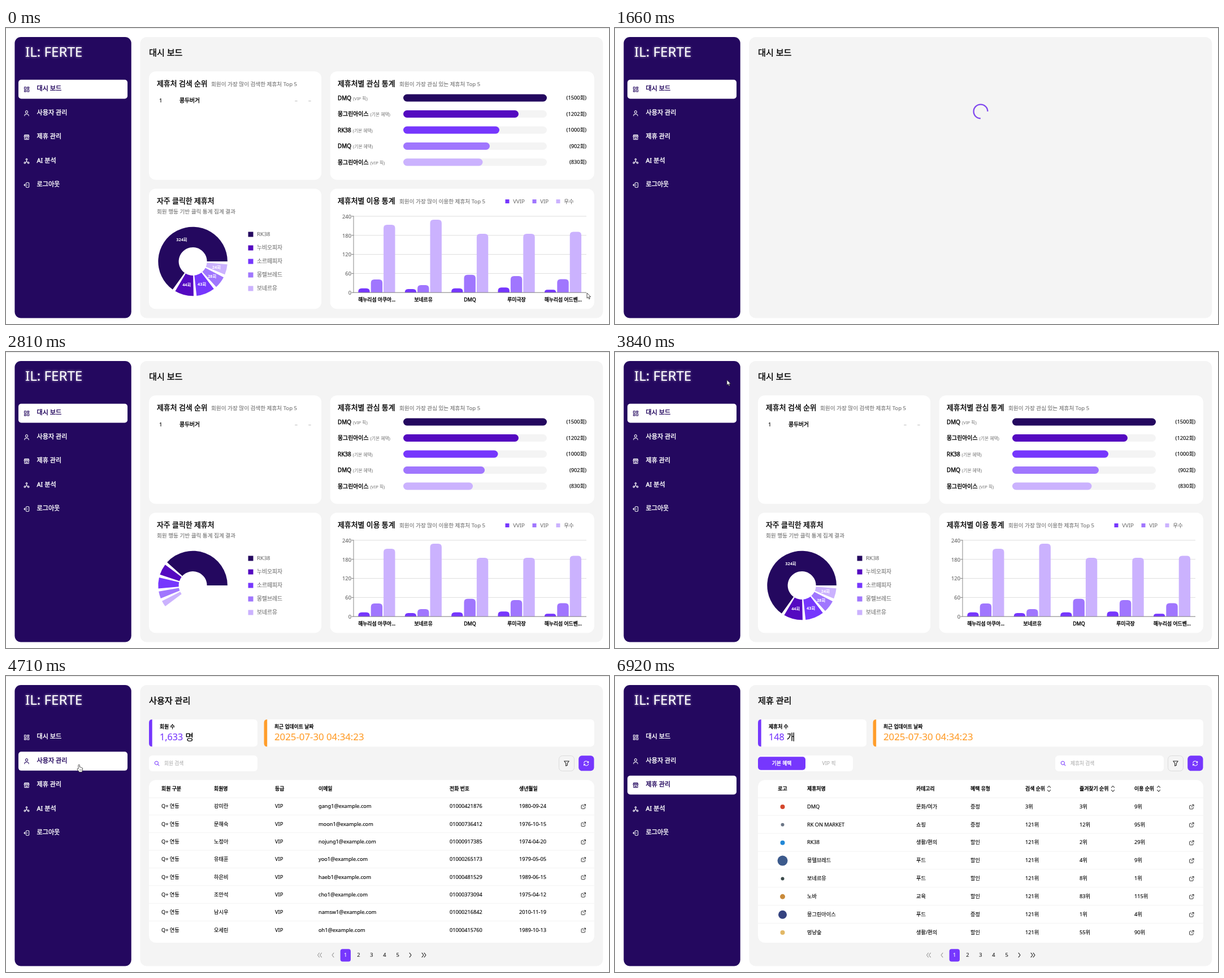
These frames come from a looping animation (1067 px wide and 525 px high, 7.19 s). An HTML page:

```html
<!DOCTYPE html>
<html lang="ko">
<head>
<meta charset="utf-8">
<title>관리자 대시 보드</title>
<style>
  html, body { margin: 0; width: 100%; height: 100%; overflow: hidden; background: #fff; }
  svg { display: block; }
  text { font-family: "Noto Sans", "Noto Sans CJK KR", "Noto Sans CJK", sans-serif; white-space: pre; }
  .line { fill: none; stroke: currentColor; stroke-linecap: round; stroke-linejoin: round; }
  .logo { text-shadow: 0 0 4px rgba(255, 255, 255, .6); }
</style>
</head>
<body>
<svg id="stage" width="1067" height="525" viewBox="0 0 1067 525"></svg>
<script>
const LOOP = 7190;
const DARK = '#24085f', PURPLE = '#7637fd', ORANGE = '#ff9d2b', PANEL = '#f4f4f4', GRAY = '#737373', PALE = '#b0b0b0';
const SHADES = [DARK, '#5409c0', PURPLE, '#a076fe', '#cbb2fe'];

// Times of the scene changes
const LOAD = 1330, MOUNT = 1925, USERS = 4380, USERS_DATA = 4600, SHOPS = 5700, SHOPS_DATA = 5960;

// ---------- drawing helpers ----------
// A thin outline gives the weights between regular and bold
const OUTLINE = { 400: 0.12, 500: 0.4, 700: 0 };
const text = (x, y, size, str, { fill = '#000', w = 400, a = 'start', more = '' } = {}) =>
  `<text x="${x}" y="${y + size * 0.365}" font-size="${size}" fill="${fill}" stroke="${fill}" stroke-width="${OUTLINE[w]}" font-weight="${w === 700 ? 700 : 400}" text-anchor="${a}" ${more}>${str}</text>`;
const rect = (x, y, w, h, r, fill, more = '') =>
  `<rect x="${x}" y="${y}" width="${w}" height="${h}" rx="${r}" fill="${fill}" ${more}/>`;
const icon = (x, y, d, color = 'currentColor', width = 1.05) =>
  `<path class="line" transform="translate(${x} ${y})" d="${d}" style="color:${color}" stroke-width="${width}"/>`;
const group = (id, body) => `<g id="${id}">${body}</g>`;
const list = (items, fn) => items.map(fn).join('');

const ICONS = {
  grid: 'M-4-4h3v4h-3zM1.2-4h3v2.4h-3zM-4 2h3v2.2h-3zM1.2.6h3v3.6h-3z',
  user: 'M0-4.3a2.1 2.1 0 1 1-.01 0M-3.6 4.6V4q0-2.5 3.6-2.5T3.6 4v.6',
  store: 'M-3.6-4h7.2l.8 3q-1.4 1.6-2.9 0q-1.5 1.6-3 0q-1.5 1.6-2.9 0zM-4-2.4H4M-3.6.2V4.2H3.6V.2M-1.2 4V1.8H1.2V4',
  nodes: 'M0-4.2a1.3 1.3 0 1 1-.01 0M-3.2 1.8a1.3 1.3 0 1 1-.01 0M3.2 1.8a1.3 1.3 0 1 1-.01 0M0-1.6V1L-2.2 2.4M0 1L2.2 2.4',
  exit: 'M-1-2V-3q0-1.2 1.2-1.2H3q1.2 0 1.2 1.2V3q0 1.2-1.2 1.2H.2Q-1 4.2-1 3V2M1.4 0H-4.6M-2.8-1.8L-4.6 0L-2.8 1.8',
  search: 'M-.7-3.8a3.1 3.1 0 1 1-.01 0M1.6 1.6L4 4',
  filter: 'M-4.2-4H4.2L1.3-.2V3.2L-1.3 4.4V-.2z',
  refresh: 'M-4-1A4 4 0 0 1 3.4-2L4-1.2M4-3.6V-1.2H1.8M4 1A4 4 0 0 1-3.4 2L-4 1.2M-4 3.6V1.2H-1.8',
  link: 'M-.2-2.6H-2.4q-1 0-1 1V2.8q0 1 1 1H2q1 0 1-1V.6M1.4-3.8H4V-1.2M4-3.8L-.4.6',
  sort: 'M-2.6-2.2L0-5L2.6-2.2M-2.6 2.2L0 5L2.6 2.2',
  left: 'M1.5-3.8L-1.5 0L1.5 3.8', right: 'M-1.5-3.8L1.5 0L-1.5 3.8',
  left2: 'M-.5-3.8L-3.5 0L-.5 3.8M3.5-3.8L.5 0L3.5 3.8', right2: 'M-3.5-3.8L-.5 0L-3.5 3.8M.5-3.8L3.5 0L.5 3.8'
};

// ---------- sidebar ----------
const NAV = [['grid', '대시 보드'], ['user', '사용자 관리'], ['store', '제휴 관리'], ['nodes', 'AI 분석'], ['exit', '로그아웃']];
const navY = i => 91.8 + i * 42.45;
const sidebar = rect(15.4, 16, 206.3, 498.5, 11, DARK) +
  text(34, 42.5, 24.1, 'IL: FERTE', { fill: '#fff', more: 'class="logo"' }) +
  list(NAV, ([ic, name], i) => `<g class="nav">${rect(22, navY(i), 193, 33.6, 5, '#fff')}` +
    icon(36.5, navY(i) + 16.9, ICONS[ic]) +
    text(54.5, navY(i) + 15.6, 11.1, name, { fill: 'currentColor', w: 500 }) + '</g>');

// ---------- dashboard ----------
const INTEREST = [['DMQ', 'VIP 픽', 1500], ['몽그린아이스', '기본 혜택', 1202], ['RK38', '기본 혜택', 1000], ['DMQ', '기본 혜택', 902], ['몽그린아이스', 'VIP 픽', 830]];
const BAR_W = [254, 204, 170, 153, 140.5];
const CLICKS = [['RK38', 324], ['누비오피자', 44], ['소르떼피자', 43], ['몽텔브레드', 28], ['보네르유', 24]];
const USAGE = [['해누리섬 아쿠아...', 13, 41, 213], ['보네르유', 11, 23.5, 229], ['DMQ', 13, 56, 185], ['루미극장', 16, 52, 185], ['해누리섬 어드벤...', 9, 42, 191]];
const BASE = 469.2, UNIT = 135.3 / 240;
const cardHead = (x, y, title, sub, subX) =>
  text(x, y, 12.9, title, { w: 500 }) + text(subX, y + 1, 9.65, sub, { fill: GRAY });

const cards = list([[253, 77, 305, 192.3], [573.6, 77, 467.2, 192.3], [253, 285, 305, 213.3], [573.6, 285, 467.2, 213.3]],
  ([x, y, w, h]) => rect(x, y, w, h, 12, '#fff'));

const interest = cardHead(587, 98, '제휴처별 관심 통계', '회원이 가장 관심 있는 제휴처 Top 5', 696) +
  list(INTEREST, ([name, kind, n], i) => {
    const y = 124 + i * 28.5;
    return text(587, y, 9.9, `${name}<tspan dx="3" font-size="7.8" fill="${GRAY}" stroke="none">(${kind})</tspan>`, { w: 500 }) +
      rect(703, y - 6.5, 254, 13, 6.5, PANEL) + rect(703, y - 6.5, BAR_W[i], 13, 6.5, SHADES[i], 'class="hbar"') +
      text(1027, y, 9.3, `(${n}회)`, { a: 'end' });
  });

const clicks = text(267, 306.5, 12.9, '자주 클릭한 제휴처', { w: 500 }) +
  text(267, 325.5, 9.65, '회원 행동 기반 클릭 통계 집계 결과', { fill: GRAY }) +
  list(CLICKS, ([name], i) => `<path class="slice" fill="${SHADES[i]}"/>` +
    rect(428.5, 361.5 + i * 24, 9, 9, 0, SHADES[i]) + text(444, 365.5 + i * 24, 9.8, name, { fill: GRAY })) +
  group('counts', list(CLICKS, ([, n]) => text(0, 0, 7.3, n + '회', { fill: '#fff', w: 700, a: 'middle' })));

const usage = cardHead(587, 306.5, '제휴처별 이용 통계', '회원이 가장 많이 이용한 제휴처 Top 5', 696) +
  list([[883.5, 'VVIP'], [931.5, 'VIP'], [973.5, '우수']], ([x, s], i) =>
    rect(x, 304, 7, 7, 0, SHADES[i + 2]) + text(x + 13.7, 307, 9.6, s, { fill: GRAY })) +
  list([0, 60, 120, 180, 240], v => {
    const y = BASE - v * UNIT;
    return `<path d="M615 ${y}H1027" stroke="#dedede"/><path d="M611.5 ${y}H615" stroke="#777"/>` +
      text(611, y + 0.5, 9.4, v, { fill: '#666', a: 'end' });
  }) +
  list(USAGE, ([name], g) => list([0, 1, 2], k => `<path class="vbar" fill="${SHADES[k + 2]}"/>`) +
    text(656.2 + g * 82.4, 482, 8.8, name, { w: 500, a: 'middle' })) +
  `<path d="M615 333.5V${BASE}H1027" fill="none" stroke="#888"/>`;

const search = cardHead(267, 98, '제휴처 검색 순위', '회원이 가장 많이 검색한 제휴처 Top 5', 363) +
  text(271, 128, 9.6, '1') + text(307, 128, 9.8, '콩두버거', { w: 500 }) +
  text(513.5, 128, 9.6, '–', { fill: PALE, a: 'middle' }) + text(537.5, 128, 9.6, '–', { fill: PALE, a: 'middle' });

const dashboard = text(253, 43, 15.1, '대시 보드', { w: 500 }) +
  group('charts', cards + search + interest + clicks + usage) +
  group('spinner', '<circle cx="647" cy="148" r="12.4" fill="none" stroke="#8048ee" stroke-width="2.3" pathLength="100" stroke-dasharray="75 25"/>');

// ---------- list pages ----------
const stat = (x, w, color) => rect(x, 77, w, 48.3, 6, '#fff') +
  `<path d="M${x + 5.7} 77v48.3q-5.7 0-5.7-6V83q0-6 5.7-6z" fill="${color}"/>`;
const countText = (n, unit) =>
  text(272, 108, 16.1, `<tspan fill="${PURPLE}" stroke="${PURPLE}">${n}</tspan> ${unit}`);
const searchBox = (x, hint) => rect(x, 141, 192, 28, 6, '#fff') + icon(x + 14, 155, ICONS.search, PURPLE) +
  text(x + 27, 154.5, 8.7, hint, { fill: PALE });
const tools = rect(978.5, 141.5, 27, 27, 6, PANEL, 'stroke="#dcdcdc"') + icon(992, 155, ICONS.filter, '#222') +
  rect(1013.2, 141.3, 27.3, 27, 6, PURPLE) + icon(1026.7, 155, ICONS.refresh, '#fff');
const table = rect(253, 184.5, 787.8, 288.5, 12, '#fff') + '<path d="M253 216H1040.8" stroke="#f0f0f0"/>';
const pager = icon(555, 495, ICONS.left2, '#999') + icon(578.5, 495, ICONS.left, '#999') +
  rect(591.6, 484.2, 18.4, 22.4, 4, PURPLE) +
  list([1, 2, 3, 4, 5], n => text(577.6 + n * 23.1, 495, 9.3, n, { fill: n === 1 ? '#fff' : '#222', a: 'middle' })) +
  icon(715.5, 495, ICONS.right, '#222') + icon(739.5, 495, ICONS.right2, '#222');
const stamp = text(475, 89.5, 8.8, '최근 업데이트 날짜', { w: 500 }) +
  text(475, 108, 16.8, '2025-07-30 04:34:23', { fill: ORANGE });
const noStamp = text(475, 99.5, 8.8, '최근 업데이트 날짜', { w: 500 });
const rows = (data, cols, y0, step, linkX) => list(data, (row, r) => {
  const y = y0 + r * step;
  return list(row, (s, c) => text(cols[c], y, 9.2, s)) + icon(linkX, y + 0.8, ICONS.link, '#222', 0.95) +
    (r < data.length - 1 ? `<path d="M253 ${y + step / 2}H1040.8" stroke="#f3f3f3"/>` : '');
});
const none = s => text(658, 231.5, 8.8, s, { a: 'middle', w: 500 });
const listPage = (title, label, unit, parts) => text(253, 43, 15.1, title, { w: 500 }) +
  stat(253, 192, PURPLE) + stat(456.5, 584.3, ORANGE) + text(272, 89.5, 8.8, label, { w: 500 }) + parts.bar + tools + table + parts.head +
  group(parts.id + 'Empty', countText(0, unit) + noStamp + none(parts.none)) +
  group(parts.id + 'Data', countText(parts.count, unit) + stamp + parts.rows + pager);

const MEMBERS = [
  ['강미란', 'gang', '01000421876', '1980-09-24'], ['문해숙', 'moon', '01000736412', '1976-10-15'],
  ['노정아', 'nojung', '01000917385', '1974-04-20'], ['유태훈', 'yoo', '01000265173', '1979-05-05'],
  ['하은비', 'haeb', '01000481529', '1989-06-15'], ['조만석', 'cho', '01000373094', '1975-04-12'],
  ['남시우', 'namsw', '01000216842', '2010-11-19'], ['오세린', 'oh', '01000415760', '1989-10-13']];
const U_COLS = [275, 368, 476, 553, 785, 908];
const users = listPage('사용자 관리', '회원 수', '명', {
  id: 'users', bar: searchBox(253, '회원 검색'), none: '회원이 없습니다.', count: '1,633',
  head: list(['회원 구분', '회원명', '등급', '이메일', '전화 번호', '생년월일'], (s, i) => text(U_COLS[i], 199.5, 8.9, s, { w: 500 })),
  rows: rows(MEMBERS.map(([n, id, tel, d]) => ['Q+ 연동', n, 'VIP', id + '1@example.com', tel, d]), U_COLS, 230.8, 31.35, 1021.5)
});

const PARTNERS = [
  ['DMQ', '문화/여가', '증정', 3, 3, 9], ['RK ON MARKET', '쇼핑', '증정', 121, 12, 95],
  ['RK38', '생활/편의', '할인', 121, 2, 29], ['몽텔브레드', '푸드', '할인', 121, 4, 9],
  ['보네르유', '푸드', '할인', 121, 8, 1], ['노바', '교육', '할인', 121, 83, 115],
  ['몽그린아이스', '푸드', '증정', 121, 1, 4], ['멍냥숲', '생활/편의', '할인', 121, 55, 90]];
const MARKS = [['#d4472c', 4], ['#6b7686', 3], ['#2388d6', 4], ['#3c5a8c', 9], ['#3a4a4a', 3], ['#c98a3a', 4.5], ['#34427f', 7.5], ['#e2b866', 4]];
const P_COLS = [340, 533, 629, 726, 822, 919];
const P_STEP = 31.87;
const shops = listPage('제휴 관리', '제휴처 수', '개', {
  id: 'shops', none: '제휴처가 없습니다.', count: 148,
  bar: rect(253, 141, 168, 28, 6, '#fff') + rect(253, 143.2, 84, 23.6, 5, PURPLE) +
    text(295, 154.5, 8.8, '기본 혜택', { fill: '#fff', w: 500, a: 'middle' }) +
    text(378.5, 154.5, 8.8, 'VIP 픽', { fill: PALE, a: 'middle' }) + searchBox(779, '제휴처 검색'),
  head: text(296.5, 199.5, 8.9, '로고', { w: 500, a: 'middle' }) +
    list(['제휴처명', '카테고리', '혜택 유형', '검색 순위', '즐겨찾기 순위', '이용 순위'], (s, i) => text(P_COLS[i], 199.5, 8.9, s, { w: 500 })) +
    list([768, 881, 962], x => icon(x, 200, ICONS.sort, '#333')),
  rows: list(MARKS, ([c, r], i) => `<circle cx="296.5" cy="${232 + i * P_STEP}" r="${r}" fill="${c}"/>`) +
    rows(PARTNERS.map(p => p.map(v => typeof v === 'number' ? v + '위' : v)), P_COLS, 231.3, P_STEP, 1020)
});

const pointer = group('arrow', '<path d="M0 0V9.2L2.2 7.3L3.7 10.8L5.2 10.1L3.8 6.8H6.6z" fill="#fff" stroke="#222" stroke-width=".8" stroke-linejoin="round"/>') +
  group('hand', '<path d="M-1.2 7V1Q-1.2 0 0 0T1.2 1V4.4Q2.4 3.8 3.2 4.9Q4.4 4.5 4.9 5.6Q6.3 5.4 6.3 6.8V9Q6.3 11 5.2 13H.2Q-1 10.5-3.4 8.4Q-3.2 6.2-1.2 7.6z" fill="#fff" stroke="#222" stroke-width=".8" stroke-linejoin="round"/><path d="M1.4 8.2v2.6M3 8.2v2.6M4.5 8.2v2.6" stroke="#555" stroke-width=".6"/>');

const stage = document.getElementById('stage');
stage.innerHTML = rect(0, 0, 1067, 1, 0, '#e4e4e4') + sidebar + rect(237.3, 16, 819, 498.5, 12, PANEL) +
  group('dashboard', dashboard) + group('users', users) + group('shops', shops) + group('cursor', pointer);

// ---------- motion ----------
const $ = id => document.getElementById(id);
const all = sel => [...stage.querySelectorAll(sel)];
const navs = all('.nav'), hbars = all('.hbar'), slices = all('.slice'), counts = all('#counts text'), vbars = all('.vbar');
const clamp = v => Math.min(1, Math.max(0, v));
const ramp = (t, a, b) => clamp((t - a) / (b - a));
const show = (id, on) => $(id).setAttribute('display', on ? 'inline' : 'none');

const bezier = (x1, y1, x2, y2) => x => {
  if (x <= 0 || x >= 1) return clamp(x);
  const at = (a, b, u) => 3 * a * u * (1 - u) ** 2 + 3 * b * u * u * (1 - u) + u ** 3;
  let lo = 0, hi = 1;
  for (let i = 0; i < 24; i++) {
    const mid = (lo + hi) / 2;
    if (at(x1, x2, mid) < x) lo = mid; else hi = mid;
  }
  return at(y1, y2, lo);
};
const ease = bezier(0.25, 0.1, 0.25, 1), easeOut = bezier(0, 0, 0.58, 1);

// Cursor stops: time, x, y
const PATHS = [
  [[0, 1028, 470], [55, 1028, 470], [205, 627, 33], [262, 627, 33]],
  [[3560, 212, 0], [3840, 198, 49.5], [4200, 129.2, 157.3], [5150, 129.2, 157.3], [5420, 119, 199.5], [5790, 119, 199.5], [6430, 341, 260], [6900, 470, 528]]
];
function cursorAt(t) {
  for (const p of PATHS) {
    const i = p.findIndex((k, n) => p[n + 1] && t >= k[0] && t < p[n + 1][0]);
    if (i < 0) continue;
    const [a, b] = [p[i], p[i + 1]], u = ramp(t, a[0], b[0]), s = u * u * (3 - 2 * u);
    return [a[1] + (b[1] - a[1]) * s, a[2] + (b[2] - a[2]) * s];
  }
  return null;
}

function drawNav(t, pos) {
  const toUsers = ramp(t, 4450, 4560), toShops = ramp(t, 5780, 5890);
  const first = t < LOAD ? 1 - ramp(t, 1040, 1130) : 1 - toUsers;
  const active = [first, toUsers - toShops, toShops, 0, 0];
  let over = false;
  navs.forEach((nav, i) => {
    const hit = pos && pos[0] > 22 && pos[0] < 215 && pos[1] > navY(i) && pos[1] < navY(i) + 33.6;
    over = over || hit;
    const w = active[i], mix = c => Math.round(255 + (c - 255) * w);
    nav.firstChild.setAttribute('opacity', Math.max(w, hit ? 0.11 : 0));
    nav.style.color = `rgb(${mix(36)},${mix(8)},${mix(95)})`;
  });
  return over;
}

function drawPie(p) {
  const gap = 5, total = CLICKS.reduce((s, c) => s + c[1], 0);
  const at = (r, deg) => {
    const a = deg * Math.PI / 180;
    return [330.6 + r * Math.cos(a), 414 - r * Math.sin(a)];
  };
  let from = 0;
  CLICKS.forEach(([, n], i) => {
    const to = from + n / total * (360 - gap * CLICKS.length) * p, big = to - from > 180 ? 1 : 0;
    slices[i].setAttribute('d', `M${at(61.3, from)}A61.3 61.3 0 ${big} 0 ${at(61.3, to)}L${at(25, to)}A25 25 0 ${big} 1 ${at(25, from)}z`);
    const [x, y] = at(43, (from + to) / 2);
    counts[i].setAttribute('x', x);
    counts[i].setAttribute('y', y + 2.6);
    from = to + gap;
  });
}

function drawColumns(p) {
  vbars.forEach((bar, i) => {
    const g = Math.floor(i / 3), k = i % 3, x = 623.3 + g * 82.4 + k * 22.4, w = 20.4;
    const h = USAGE[g][k + 1] * UNIT * p, r = Math.min(6, h), top = BASE - h;
    bar.setAttribute('d', `M${x} ${BASE}V${top + r}q0 ${-r} ${r} ${-r}h${w - 2 * r}q${r} 0 ${r} ${r}V${BASE}z`);
  });
}

function draw(t) {
  const pos = cursorAt(t), over = drawNav(t, pos);
  show('dashboard', t < USERS);
  show('users', t >= USERS && t < SHOPS);
  show('shops', t >= SHOPS);
  show('usersEmpty', t < USERS_DATA);
  show('usersData', t >= USERS_DATA);
  show('shopsEmpty', t < SHOPS_DATA);
  show('shopsData', t >= SHOPS_DATA);

  const fresh = t < LOAD, loading = !fresh && t < MOUNT, age = fresh ? 1e4 : t - MOUNT;
  show('charts', !loading);
  show('spinner', loading);
  $('spinner').setAttribute('transform', `rotate(${90 + (t - 1660) * 0.36} 647 148)`);
  hbars.forEach((bar, i) => bar.setAttribute('width', BAR_W[i] * easeOut(clamp((age - i * 80) / 800))));
  drawColumns(ease(clamp(age / 400)));
  const pie = clamp((age - 375) / 1500);
  drawPie(ease(pie));
  show('counts', pie === 1);

  show('cursor', !!pos);
  show('hand', over);
  show('arrow', !over);
  if (pos) $('cursor').setAttribute('transform', `translate(${pos})`);
}

function tick(now) {
  draw(now % LOOP);
  requestAnimationFrame(tick);
}
draw(0);
requestAnimationFrame(tick);
</script>
</body>
</html>
```
